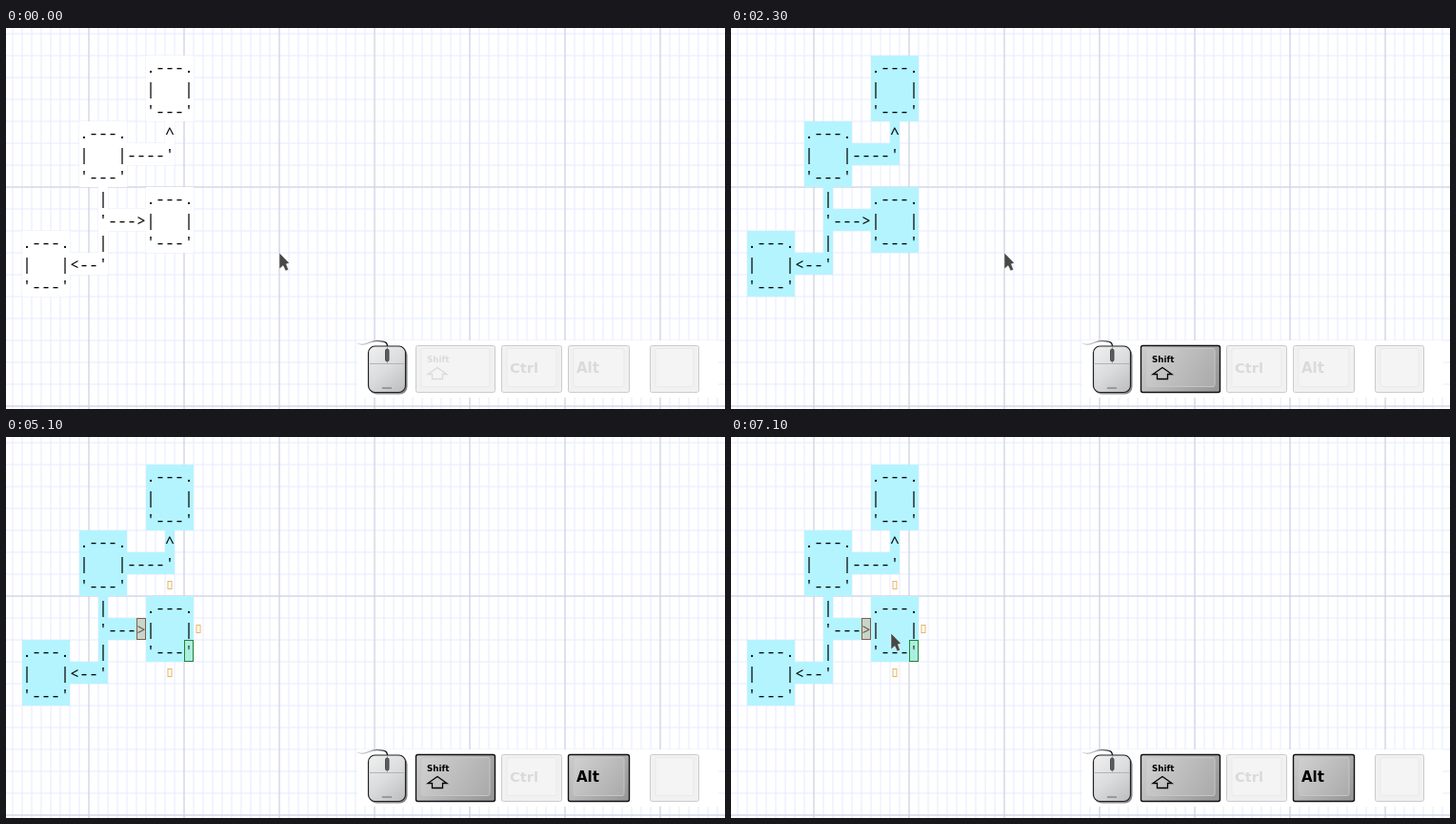
These frames come from a looping animation (755 by 400 pixels, 8 s). An HTML page with a canvas:

```html
<!DOCTYPE html>
<html lang="en">
<head>
<meta charset="utf-8">
<title>Diagram editor</title>
<style>
html, body { margin: 0; width: 100%; height: 100%; overflow: hidden; background: #fff; }
canvas { display: block; }
</style>
</head>
<body>
<canvas id="stage" width="755" height="400"></canvas>
<script>
const ctx = document.getElementById('stage').getContext('2d', { alpha: false });
const W = 755, H = 400, LOOP = 8000, STEP = 100;
const CW = 10, CH = 23, LEFT = 17, TOP = 29;

const art = `
             .---.
             |   |
             '---'
      .---.    ^
      |   |----'
      '---'
        |    .---.
        '--->|   |
.---.   |    '---'
|   |<--'
'---'`.split('\n').slice(1);

const between = (t, a, b) => t >= a && t < b;
const mix = (a, b, k) => a + (b - a) * k;

// Glides of the pointer; bend below 1 lets y run ahead of x
const glides = [
  { from: 2300, to: 2400, x: 276, y: 233 },
  { from: 2600, to: 3000, x: 180, y: 200 },
  { from: 4400, to: 5000, x: 573, y: 345 },
  { from: 5100, to: 5400, x: 467, y: 297 },
  { from: 5400, to: 5800, x: 647, y: 374 },
  { from: 5800, to: 6000, x: 625, y: 370 },
  { from: 6100, to: 6900, x: 164, y: 207, bend: 0.4 },
  { from: 6900, to: 7100, x: 168, y: 205 }
];

function pointerAt(t) {
  let x = 287, y = 235;
  for (const g of glides) {
    const u = Math.min(1, Math.max(0, (t - g.from) / (g.to - g.from)));
    const k = u * u * (3 - 2 * u);
    x = mix(x, g.x, k);
    y = mix(y, g.y, k ** (g.bend || 1));
  }
  return [x, y];
}

function grid(dx, dy, color) {
  ctx.strokeStyle = color;
  ctx.lineWidth = 1;
  ctx.beginPath();
  for (let x = 87 % dx; x < W; x += dx) { ctx.moveTo(x, 0); ctx.lineTo(x, H); }
  for (let y = 167 % dy; y < H; y += dy) { ctx.moveTo(0, y); ctx.lineTo(W, y); }
  ctx.stroke();
}

function paint(fill, stroke, width = 1) {
  if (fill) { ctx.fillStyle = fill; ctx.fill(); }
  if (stroke) { ctx.strokeStyle = stroke; ctx.lineWidth = width; ctx.stroke(); }
}

function polygon(points, ...style) {
  ctx.beginPath();
  points.forEach(([x, y]) => ctx.lineTo(x, y));
  ctx.closePath();
  paint(...style);
}

function round(x, y, w, h, r, ...style) {
  ctx.beginPath();
  ctx.roundRect(x, y, w, h, r);
  paint(...style);
}

function gradient(x0, y0, x1, y1, ...colors) {
  const g = ctx.createLinearGradient(x0, y0, x1, y1);
  colors.forEach((c, i) => g.addColorStop(i / (colors.length - 1), c));
  return g;
}

function diagram(selected) {
  ctx.font = '16.67px "Noto Sans Mono", monospace';
  art.forEach((row, r) => {
    const y = TOP + r * CH;
    // a box side keeps its inner blanks filled
    for (const run of row.matchAll(/(\|   \||\S)+/g)) {
      ctx.fillStyle = selected ? '#b4f4ff' : '#fff';
      ctx.fillRect(LEFT + run.index * CW, y, run[0].length * CW, CH);
    }
    ctx.fillStyle = '#000';
    [...row].forEach((ch, c) => ctx.fillText(ch, LEFT + c * CW, y + 18));
  });
}

function cell(col, row, fill, stroke) {
  const x = LEFT + col * CW, y = TOP + row * CH;
  ctx.fillStyle = fill;
  ctx.fillRect(x, y, CW, CH);
  ctx.strokeStyle = stroke;
  ctx.lineWidth = 1;
  ctx.strokeRect(x + 0.5, y + 0.5, CW - 1, CH - 1);
}

function connector(col, row) {
  ctx.strokeStyle = '#e6b566';
  ctx.lineWidth = 1;
  ctx.strokeRect(LEFT + (col + 0.5) * CW - 2, TOP + (row + 0.5) * CH - 4, 4, 8);
}

function handles() {
  connector(15, 5);
  connector(18, 7);
  connector(15, 9);
  cell(12, 7, 'rgba(220,185,150,.5)', '#86604a');
  cell(17, 8, 'rgba(150,225,150,.3)', '#268038');
}

const ink = on => on ? '#000' : '#dadada';

function key(x, w, on, text = '', size = 15, dx = 9, base = 362) {
  const y = 333.5, h = 49;
  const shade = (...colors) => gradient(x, y, x + w, y + h, ...colors);
  round(x + 0.5, y, w, h, 2, on ? shade('#cfcfcf', '#949494') : '#f1f1f1',
    on ? '#111' : '#cbcbcb', on ? 1.4 : 1);
  round(x + 6, y + 3, w - 11, h - 9, 2, on ? shade('#d4d4d4', '#a6a6a6') : '#f4f4f4',
    on ? '#c6c6c6' : '#e9e9e9');
  ctx.font = `bold ${size}px "DejaVu Sans", sans-serif`;
  ctx.fillStyle = ink(on);
  ctx.fillText(text, x + dx, base);
}

function shiftArrow(on) {
  const half = [[0, 356.5], [10, 363.5], [5.5, 363.5], [5.5, 368.5]];
  const side = s => half.map(([x, y]) => [453 + s * x, y]);
  polygon([...side(1), ...side(-1).reverse()], null, ink(on), 1.3);
}

function mouse() {
  ctx.beginPath();
  ctx.moveTo(369, 331);
  ctx.bezierCurveTo(378, 335, 381, 328, 390, 328.5);
  ctx.bezierCurveTo(397, 329, 401, 329, 400.5, 336);
  paint(null, gradient(369, 0, 400, 0, '#ddd', '#aaa', '#111'), 1.3);
  round(381.5, 335.5, 40, 49, 8, '#888');
  round(380.5, 334, 39, 48.5, 7,
    gradient(380, 334, 420, 383, '#f1f1f1', '#dadcde', '#b9bbbd'), '#222', 1.2);
  ctx.beginPath();
  ctx.moveTo(382, 352.5);
  ctx.lineTo(419, 352.5);
  ctx.moveTo(400.5, 335);
  ctx.lineTo(400.5, 352);
  paint(null, '#b4b4b4');
  round(398.5, 337, 3.5, 13, 1.7, '#5c5f62', '#333', 0.8);
  ctx.fillStyle = '#9a9a9a';
  ctx.fillRect(395, 377, 10, 2);
}

function keyboard(shift, alt, v) {
  ctx.fillStyle = '#fff';
  ctx.fillRect(369, 328, 379, 60);
  mouse();
  key(430, 83, shift, 'Shift', 8.7, 12, 351);
  shiftArrow(shift);
  key(520, 63, false, 'Ctrl', 14.7);
  key(590, 64, alt, 'Alt');
  key(676, 51, v, v ? 'V' : '', 21, 18, 365);
}

function pointer(x, y) {
  const shape = [[0, 1], [10.5, 11.8], [7.3, 12.8], [9.6, 18.8], [6.6, 20], [4, 14.6], [0, 18]];
  polygon(shape.map(([dx, dy]) => [x + dx, y + dy]), '#484848', 'rgba(255,255,255,.6)', 0.8);
}

function draw(t) {
  ctx.fillStyle = '#fff';
  ctx.fillRect(0, 0, W, H);
  grid(CW, CH, '#e5ebff');
  grid(CW * 10, CH * 10, '#cbcedb');
  diagram(t >= 1700);
  if (t >= 4200) handles();
  keyboard(between(t, 900, 2800) || t >= 4200, t >= 3700, between(t, 1600, 2300));
  if (!between(t, 5100, 5500)) pointer(...pointerAt(t));
}

const start = performance.now();
function tick() {
  const t = (performance.now() - start) % LOOP;
  draw(Math.floor(t / STEP) * STEP);
  requestAnimationFrame(tick);
}
tick();
</script>
</body>
</html>
```
